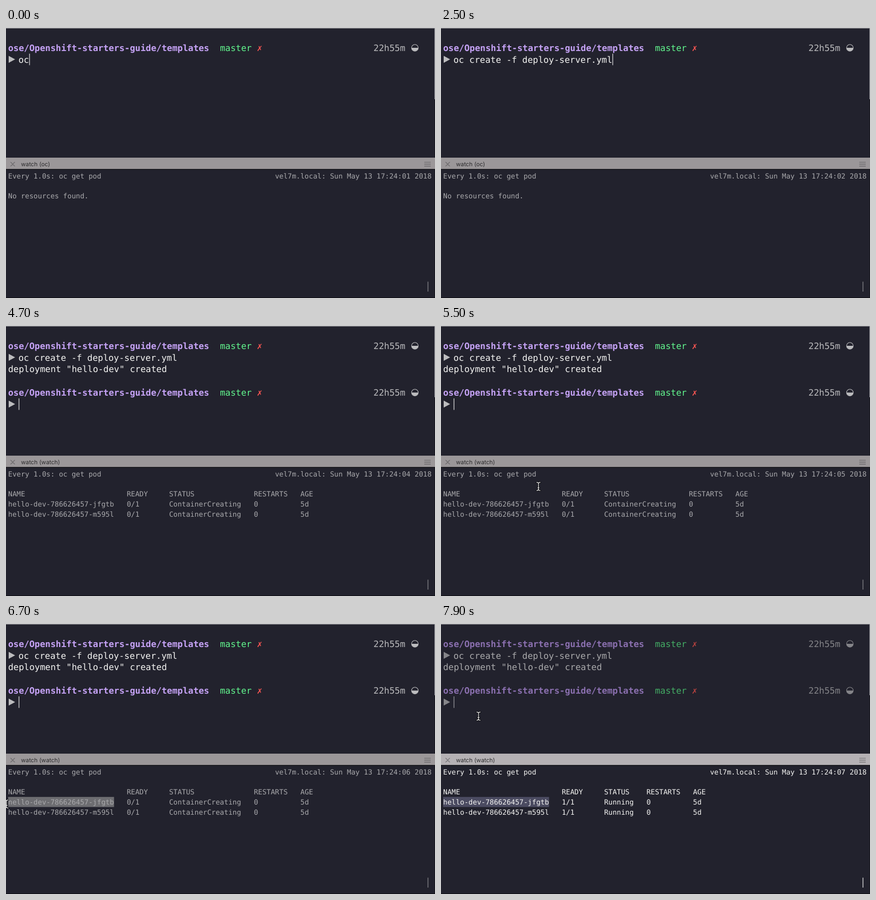
These frames come from a looping animation (800x504 px, 8 s). An HTML page:

```html
<!DOCTYPE html>
<html lang="en">
<head>
<meta charset="utf-8">
<title>Terminal</title>
<style>
  html, body { margin: 0; width: 100%; height: 100%; overflow: hidden; background: #22222d; }
  svg { display: block; width: 800px; height: 504px; }
  text { white-space: pre; text-rendering: geometricPrecision; fill: var(--fg); }
  #top, #low { font-family: "DejaVu Sans Mono", "Liberation Mono", monospace; }
  #top { font-size: 16.4px; --fg: #f4f4f2; --path: #c6a3f6; --ok: #62f78e; --bad: #ff5754; --soft: #bcbcbe; --caret: #d4d4d6; }
  #low { font-size: 13.12px; --fg: #a9a9ac; --sel: #6d6d71; --caret: #8a8a90; }
  #bar { font: 10.8px Inter, "Open Sans", sans-serif; --fill: #9b9799; --fg: #2c2b2d; --icon: #686668; }
  .away #top { --fg: #a9a9ab; --path: #8b70b0; --ok: #44ad65; --bad: #b8423f; --soft: #858589; --caret: #95959a; }
  .away #low { --fg: #f6f6f4; --sel: #4b4b61; --caret: #ededee; }
  .away #bar { --fill: #b5b1b4; --icon: #737174; }
  .path { fill: var(--path); font-weight: bold; }
  .ok { fill: var(--ok); }
  .bad { fill: var(--bad); }
  .soft { fill: var(--soft); }
</style>
</head>
<body>
<svg id="stage" viewBox="0 0 800 504">
  <rect width="800" height="504" fill="#22222d"/>
  <rect width="800" height="1" fill="#8b8b90"/>
  <rect x="799" width="1" height="133" fill="#a5a5a9"/>
  <rect x="799" y="133" width="1" height="371" fill="#14141b"/>
  <g id="top"></g>
  <g id="bar">
    <rect y="242" width="800" height="21.5" fill="var(--fill)"/>
    <rect y="263.3" width="800" height="1.2" fill="#0c0c11"/>
    <path d="M8.5 250.2l8 8m0-8l-8 8M780 250.5h12m-12 3.7h12m-12 3.7h12" stroke="var(--icon)" stroke-width="1.2"/>
    <text id="title" x="28" y="258"></text>
  </g>
  <g id="low"></g>
  <rect y="503" width="800" height="1" fill="#0d0d12"/>
  <g id="mouse" fill="none" stroke-linecap="round">
    <path id="beam" d="M-3.2-7.6Q0-7.6 0-5V5Q0 7.6-3.2 7.6M3.2-7.6Q0-7.6 0-5M3.2 7.6Q0 7.6 0 5M-1.5 2.5h3" stroke="#0b0b0f" stroke-width="3"/>
    <use href="#beam" style="stroke:#fff"/>
    <path d="M-3.2-7.6Q0-7.6 0-5V5Q0 7.6-3.2 7.6M3.2-7.6Q0-7.6 0-5M3.2 7.6Q0 7.6 0 5M-1.5 2.5h3" stroke="#f4f4f4" stroke-width="1.2"/>
  </g>
</svg>
<script>
const LOOP = 8000, STEP = 100;
const $ = id => document.getElementById(id);
const SVG = "http://www.w3.org/2000/svg";

function add(parent, tag, attrs, text = "") {
  const el = document.createElementNS(SVG, tag);
  for (const k in attrs) el.setAttribute(k, attrs[k]);
  el.textContent = text;
  parent.appendChild(el);
  return el;
}

// Character grids of the two panes
const topX = col => 4 + col * 9.874, topY = row => 42.7 + row * 21.8;
const lowX = col => 4 + col * 7.899, lowY = row => 280.7 + row * 18.8;
const topText = (g, col, row, text, cls = "") => add(g, "text", { x: topX(col), y: topY(row), class: cls }, text);
const lowText = (g, col, row, text) => add(g, "text", { x: lowX(col), y: lowY(row) }, text);

function prompt(row) {
  const g = add($("top"), "g", {}), y = topY(row) - 5.7, a = y + 21.5;
  topText(g, 0, row, "ose/Openshift-starters-guide/templates", "path");
  topText(g, 40, row, "master", "ok");
  topText(g, 47, row, "✗", "bad");
  topText(g, 69, row, "22h55m", "soft");
  add(g, "circle", { cx: 762.5, cy: y, r: 6.2, fill: "none", stroke: "var(--soft)", "stroke-width": 1.1 });
  add(g, "path", { d: `M756.3 ${y}a6.2 6.2 0 0 0 12.4 0z`, class: "soft" });
  add(g, "path", { d: `M5 ${a - 6.5}L17 ${a}L5 ${a + 6.5}z`, class: "soft" });
  return g;
}

function table(ready, status, gap) {
  const g = add($("low"), "g", {});
  const line = (row, cells) => [0, 28, 38, gap, gap + 11].forEach((col, i) => lowText(g, col, row, cells[i]));
  line(2, ["NAME", "READY", "STATUS", "RESTARTS", "AGE"]);
  ["jfgtb", "m595l"].forEach((id, i) => line(3 + i, ["hello-dev-786626457-" + id, ready, status, "0", "5d"]));
  return g;
}

prompt(0);
const command = topText($("top"), 1.95, 1, "");
const output = topText($("top"), 0, 2, 'deployment "hello-dev" created');
const nextPrompt = prompt(4);
const caret = add($("top"), "rect", { width: 1.3, height: 21.5, fill: "var(--caret)" });

const selection = add($("low"), "rect", { y: 322.8, height: 18.8, fill: "var(--sel)" });
lowText($("low"), 0, 0, "Every 1.0s: oc get pod");
const clock = lowText($("low"), 63, 0, "");
const empty = lowText($("low"), 0, 2, "No resources found.");
const creating = table("0/1", "ContainerCreating", 58);
const running = table("1/1", "Running", 48);
add($("low"), "rect", { x: 786.3, y: 473.5, width: 1.2, height: 18.5, fill: "var(--caret)" });

// [time, value] steps; the last one reached holds
const typed = [
  [0, 2], [100, 3], [200, 4], [400, 5], [500, 6], [600, 7], [800, 8], [900, 9],
  [1600, 10], [1700, 11], [1800, 12], [1900, 13], [2000, 14], [2100, 16], [2200, 30]
];
const ticks = [[0, 1], [1200, 2], [2600, 3], [4000, 4], [5000, 5], [5900, 6], [6800, 7]];
const carets = [[0, 1], [2600, 2], [2900, 3], [3400, 5]];
const path = [
  [5200, 118, 190], [5600, 203, 336], [5700, 198, 337], [6100, 50, 337], [6500, 17, 337],
  [6600, 1, 336], [7000, 1, 336], [7400, 33, 334], [7700, 62, 215], [7900, 70, 172]
];
const LINE = "oc create -f deploy-server.yml";

const held = (steps, t) => steps.filter(s => s[0] <= t).pop()[1];
const show = (el, on) => el.setAttribute("visibility", on ? "visible" : "hidden");

function pointAt(t) {
  const i = path.findIndex(p => p[0] > t);
  if (i < 0) return path[path.length - 1].slice(1);
  if (i === 0) return path[0].slice(1);
  const [a, b] = [path[i - 1], path[i]], k = (t - a[0]) / (b[0] - a[0]);
  return [1, 2].map(n => a[n] + (b[n] - a[n]) * k);
}

function draw(t) {
  const count = held(typed, t), row = held(carets, t);
  command.textContent = LINE.slice(0, count);
  show(output, t >= 2900);
  show(nextPrompt, t >= 3400);
  caret.setAttribute("x", row === 1 ? topX(1.95 + count) + 0.2 : row === 5 ? 23.6 : 4);
  caret.setAttribute("y", topY(row) - 16.6);

  const listed = t >= 4000, ready = t >= 6800;
  clock.textContent = `vel7m.local: Sun May 13 17:24:0${held(ticks, t)} 2018`;
  $("title").textContent = listed ? "watch (watch)" : "watch (oc)";
  show(empty, !listed);
  show(creating, listed && !ready);
  show(running, ready);
  $("stage").classList.toggle("away", ready);

  const [x, y] = pointAt(t);
  show($("mouse"), t >= 5200);
  $("mouse").setAttribute("transform", `translate(${x} ${y})`);
  const reach = t >= 6600 ? 0 : Math.max(0, Math.min(25, Math.round((x - 4) / 7.899)));
  show(selection, t >= 5700);
  selection.setAttribute("x", lowX(reach));
  selection.setAttribute("width", lowX(25) - lowX(reach));
}

function frame() {
  draw(Math.floor(performance.now() % LOOP / STEP) * STEP);
  requestAnimationFrame(frame);
}
frame();
</script>
</body>
</html>
```
